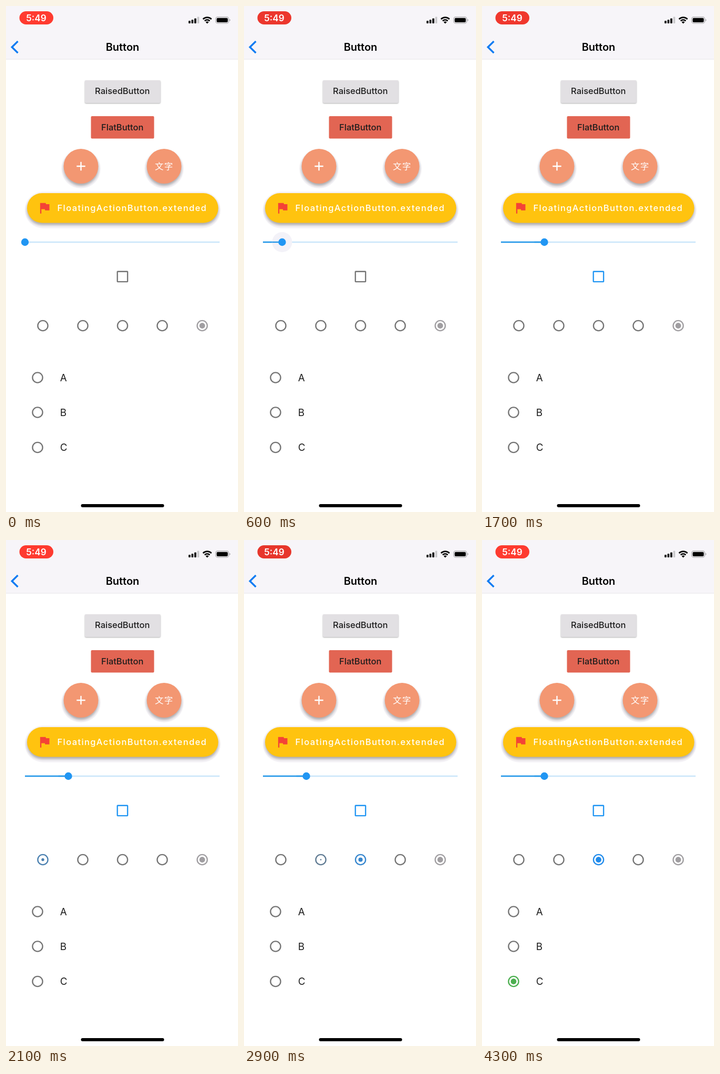
Write an HTML page that moves like this. It is 441x960 px and loops after 4400 ms.

```html
<!DOCTYPE html>
<html lang="en">
<head>
<meta charset="utf-8">
<title>Button</title>
<style>
  html, body { margin: 0; width: 100%; height: 100%; overflow: hidden; background: #fff; }
  svg { display: block; width: 100vw; height: 100vh; }
  text { font: 500 16.46px Inter, "Noto Sans CJK SC", "Noto Sans CJK", sans-serif; fill: #1c1c1c; }
  .mid { text-anchor: middle; }
  .wide { letter-spacing: 1.41px; fill: #fff; }
  .item { font-size: 18.8px; font-weight: 400; }
  .halo { fill: #f6f4f8; }
  .raised { filter: drop-shadow(0 4px 2.5px rgba(0, 0, 0, .3)); }
  .line { fill: none; stroke-width: 2.35; }
</style>
</head>
<body>
<svg viewBox="0 0 441 960">
  <!-- status and navigation bars -->
  <rect width="441" height="101" fill="#f7f5f9"/>
  <rect y="100.5" width="441" height="1" fill="#e6e5e8"/>
  <rect id="pill" x="25.5" y="10" width="64.5" height="25" rx="12.5"/>
  <text class="mid" x="57.5" y="28.7" style="font-size:17.2px;font-weight:600;fill:#fff">5:49</text>
  <g>
    <rect x="347" y="28" width="3.7" height="5" rx="1"/>
    <rect x="352.5" y="26" width="3.7" height="7" rx="1"/>
    <rect x="358" y="23.5" width="3.7" height="9.5" rx="1"/>
    <rect x="363.5" y="20.5" width="3.7" height="12.5" rx="1" fill="#c9c8cb"/>
  </g>
  <g class="line" stroke="#000" style="stroke-width:2.6">
    <path d="M374.5 25A11.2 11.2 0 0 1 390.500 25"/>
    <path d="M377.700 28.300A6.600 6.600 0 0 1 387.300 28.300"/>
  </g>
  <path d="M379.500 30.400Q382.500 28 385.500 30.400L382.500 33.400Z"/>
  <rect x="398.500" y="20.800" width="25" height="12" rx="3.800" fill="none" stroke="#a9a8ab" stroke-width="1.200"/>
  <rect x="400.400" y="22.700" width="21.200" height="8.200" rx="2"/>
  <path d="M424.800 24.800q1.700.6 1.700 2t-1.700 2z" fill="#a9a8ab"/>
  <path class="line" d="M22.500 67L11.300 78L22.500 89" stroke="#0b7bf2" style="stroke-width:3.400"/>
  <text class="mid" x="221.5" y="85" style="font-size:20px;font-weight:600;fill:#000">Button</text>

  <!-- buttons -->
  <rect x="150" y="141" width="143.500" height="43" rx="2" fill="#e2e0e3"
        style="filter:drop-shadow(0 1.500px 1.200px rgba(0,0,0,.32))"/>
  <text class="mid" x="221.200" y="167.300">RaisedButton</text>
  <rect x="161.500" y="209" width="120" height="42.500" rx="2" fill="#e26553"/>
  <text class="mid" x="221.200" y="236.200">FlatButton</text>
  <circle class="halo" cx="142.500" cy="309" r="37"/>
  <circle class="halo" cx="300.500" cy="309" r="37"/>
  <g class="raised" fill="#f39772">
    <circle cx="142.500" cy="304" r="33"/>
    <circle cx="300.500" cy="304" r="33"/>
  </g>
  <path class="line" d="M134.300 304h16.400M142.500 295.800v16.400" stroke="#fff"/>
  <text class="wide" x="283" y="310">文字</text>
  <rect class="halo" x="36" y="352" width="371.500" height="70" rx="35"/>
  <rect class="raised" x="40" y="355" width="363.500" height="56.500" rx="28.250" fill="#ffc30f"/>
  <path transform="translate(59 369) scale(1.176)" fill="#f44336"
        d="M14.4 6L14 4H5v17h2v-7h5.6l.4 2h7V6z"/>
  <text class="wide" x="97.500" y="389.200">FloatingActionButton.extended</text>

  <!-- slider -->
  <path class="line" d="M36 448H406" stroke="#c9e5fa"/>
  <path id="track" class="line" stroke="#2196e8"/>
  <circle id="glow" cy="448" fill="#f3f2f8"/>
  <path id="glowTrack" class="line" stroke="#2196e8"/>
  <circle id="thumb" cy="448" r="7.200" fill="#2196f3"/>

  <!-- checkbox -->
  <rect id="box" class="line" x="211.700" y="503.700" width="19.400" height="19.400" rx=".6"/>
  <path id="tick" class="line" pathLength="1" stroke="#fff" stroke-dasharray="1 2"
        d="M214 512.300L219.300 517.600L229 508"/>

  <g id="radios"></g>
  <text class="item" x="102.800" y="711.800">A</text>
  <text class="item" x="102.800" y="778">B</text>
  <text class="item" x="102.800" y="844.300">C</text>
  <rect x="142.500" y="945" width="158" height="6" rx="3"/>
</svg>
<script>
const LOOP = 4400, STEP = 100, TOGGLE = 200;
const GRAY = [117, 117, 117], BLUE = [33, 139, 235], DISABLED = [160, 158, 161];
const $ = id => document.getElementById(id);
const set = (node, attrs) => {
  for (const name in attrs) node.setAttribute(name, attrs[name]);
};
const ramp = (t, start, length) => Math.min(1, Math.max(0, (t - start) / length));
const smooth = p => p * p * (3 - 2 * p);
const mix = (a, b, p) => `rgb(${a.map((v, i) => Math.round(v + (b[i] - v) * p))})`;

// Each radio is selected at `on` and released at `off`.
const radios = [
  { x: 70, y: 606.5, color: BLUE, on: 2000, off: 2420 },
  { x: 146, y: 606.5, color: BLUE, on: 2420, off: 2750 },
  { x: 221.5, y: 606.5, color: BLUE, on: 2750, off: LOOP },
  { x: 297, y: 606.5, color: BLUE, on: LOOP, off: LOOP },
  { x: 373, y: 606.5, color: DISABLED, on: -TOGGLE, off: LOOP },
  { x: 60, y: 705, color: [232, 62, 48], on: 3080, off: 3455 },
  { x: 60, y: 771, color: [205, 190, 50], on: 3455, off: 3900 },
  { x: 60, y: 837.5, color: [76, 175, 80], on: 3900, off: LOOP }
];

function addCircle(attrs) {
  const circle = document.createElementNS($("radios").namespaceURI, "circle");
  set(circle, attrs);
  return $("radios").appendChild(circle);
}
for (const radio of radios) {
  const center = { cx: radio.x, cy: radio.y };
  radio.ring = addCircle({ ...center, r: 9.6, class: "line" });
  radio.dot = addCircle(center);
}

function draw(t) {
  const pulse = (1 - Math.cos(t / 2200 * 2 * Math.PI)) / 2;
  set($("pill"), { fill: mix([255, 59, 48], [221, 52, 43], pulse) });

  const x = 36 + 82.5 * smooth(ramp(t, 300, 650));
  const press = ramp(t, 250, 100) - ramp(t, 1050, 100);
  set($("track"), { d: `M36 448H${x}` });
  set($("glow"), { cx: x, r: 19 * press });
  set($("glowTrack"), { d: `M${Math.max(36, x - 19)} 448H${x}` });
  set($("thumb"), { cx: x });

  const checked = ramp(t, 1350, TOGGLE);
  const filled = Math.min(1, checked * 2);
  const color = mix(GRAY, [33, 150, 243], filled);
  set($("box"), { stroke: color, fill: color, "fill-opacity": filled });
  const drawn = ramp(checked, 0.5, 0.5);
  set($("tick"), { "stroke-dashoffset": 1 - drawn, opacity: drawn > 0 ? 1 : 0 });

  for (const { color, on, off, ring, dot } of radios) {
    const selected = ramp(t, on, TOGGLE) - ramp(t, off, TOGGLE);
    const tint = mix(GRAY, color, selected);
    set(ring, { stroke: tint });
    set(dot, { fill: tint, r: 5.4 * selected });
  }
}

function frame() {
  const t = performance.now() % LOOP;
  draw(Math.floor(t / STEP) * STEP);
  requestAnimationFrame(frame);
}
frame();
</script>
</body>
</html>
```
